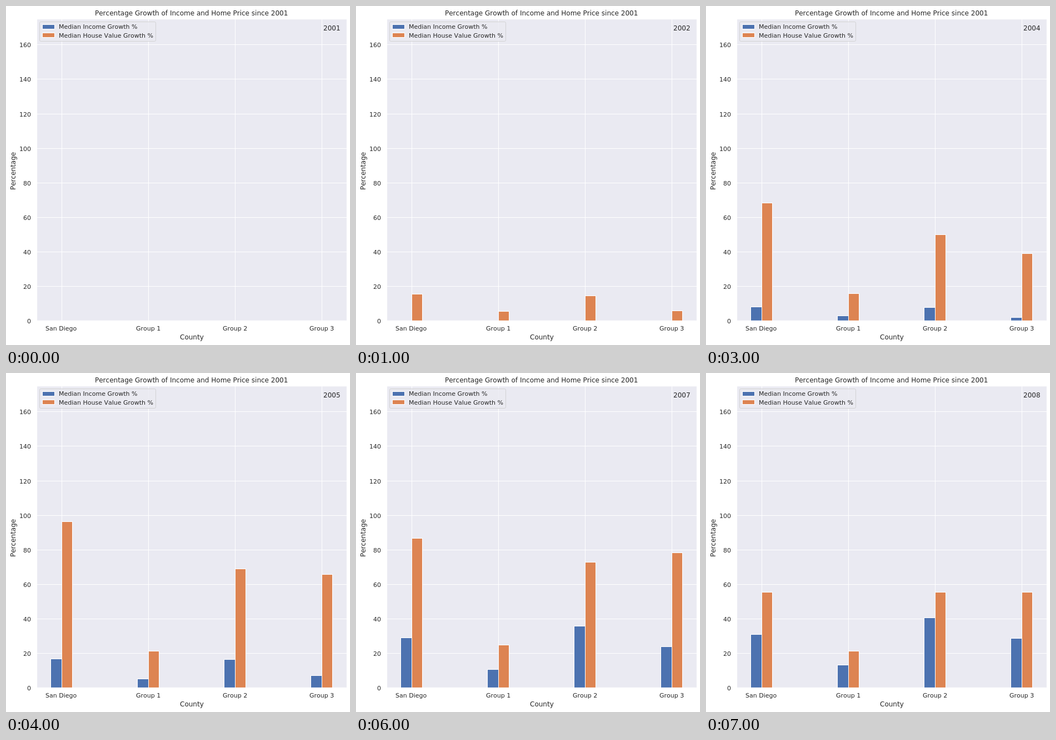
Recreate the animation shown at these times as an HTML page. Size 619 px wide and 610 px high, loop 8 s.

```html
<!DOCTYPE html>
<html lang="en">
<head>
<meta charset="utf-8">
<title>Income and home price growth</title>
<style>
  html, body { margin: 0; width: 100%; height: 100%; overflow: hidden; background: #fff; }
  svg { display: block; }
  text { font: 11px "DejaVu Sans", sans-serif; font-kerning: none; fill: #262626; }
  .big { font-size: 12px; }
  .end { text-anchor: end; }
  .grid { stroke: #fff; }
  .income { fill: #4c72b0; stroke: #fff; }
  .house { fill: #dd8452; stroke: #fff; }
</style>
</head>
<body>
<svg width="619" height="610" viewBox="0 0 619 610">
  <clipPath id="plot"><rect x="56" y="24" width="557" height="542"/></clipPath>
  <rect x="56" y="24" width="557" height="542" fill="#eaeaf2"/>
  <g id="axes"></g>
  <g id="bars" clip-path="url(#plot)"></g>
  <rect x="55.5" y="23.5" width="558" height="543" fill="none" stroke="#fff" stroke-width="1.25"/>
  <rect x="60.5" y="28.5" width="209" height="35" rx="2.2" fill="#eaeaf2" fill-opacity=".8" stroke="#ccc" stroke-opacity=".8"/>
  <rect class="income" x="65.5" y="33.5" width="22" height="8"/>
  <rect class="house" x="65.5" y="48.5" width="22" height="8"/>
  <text x="95" y="41">Median Income Growth %</text>
  <text x="95" y="57">Median House Value Growth %</text>
  <text class="big" x="160" y="17">Percentage Growth of Income and Home Price since 2001</text>
  <text class="big" x="313" y="600">County</text>
  <text class="big" transform="translate(17 331) rotate(-90)">Percentage</text>
  <text class="big" id="year" x="571" y="44">2001</text>
</svg>
<script>
const STEP = 1000, FIRST_YEAR = 2001, YEARS = 8;

// income: S-curve limit, midpoint, steepness; house: bell peak, peak time, spread
const counties = [
  { name: "San Diego", income: [33.5, 3.82, 1.1], house: [105, 4.8, 2.75] },
  { name: "Group 1", income: [20, 5.2, 0.56], house: [25.3, 5.5, 3.65] },
  { name: "Group 2", income: [46, 4.45, 0.95], house: [78.3, 5.13, 3.19] },
  { name: "Group 3", income: [33.5, 4.95, 1.1], house: [84, 5.3, 2.63] }
];

// Growth in percent, t years after the first; income dips slightly before it rises
const curves = {
  income: (t, [limit, mid, k]) => Math.max(0, limit / (1 + Math.exp(k * (mid - t))) - 1.5),
  house: (t, [peak, mid, spread]) => t ? peak * Math.exp(-(((t - mid) / spread) ** 2)) : 0
};

const $ = id => document.getElementById(id);
const yOf = v => Math.floor(566.8 - 3.1065 * v) + 0.5;
const xOf = i => 100.5 + 156 * i;

function add(parent, tag, attrs, text = "") {
  const el = document.createElementNS("http://www.w3.org/2000/svg", tag);
  for (const k in attrs) el.setAttribute(k, attrs[k]);
  el.textContent = text;
  return $(parent).appendChild(el);
}

for (let v = 0; v <= 160; v += 20) {
  const y = yOf(v);
  add("axes", "path", { class: "grid", d: `M56 ${y}H613` });
  add("axes", "text", { class: "end", x: 45, y: y + 4.5 }, v);
}

const bars = [];
counties.forEach((county, i) => {
  const x = xOf(i);
  add("axes", "path", { class: "grid", d: `M${x} 24V566` });
  add("axes", "text", { x: x - (i ? 22.5 : 29.5), y: 584 }, county.name);
  for (const kind of ["income", "house"]) {
    const house = kind === "house";
    const el = add("bars", "rect", { class: kind, x: house ? x : x - 20, width: house ? 19 : 20 });
    bars.push({ el, value: t => curves[kind](t, county[kind]) });
  }
});

let shown = -1;
function draw(now) {
  const t = Math.floor(now / STEP) % YEARS;
  if (t !== shown) {
    shown = t;
    $("year").textContent = FIRST_YEAR + t;
    for (const { el, value } of bars) {
      const y = yOf(value(t));
      el.setAttribute("y", y);
      el.setAttribute("height", 566.5 - y);
    }
  }
  requestAnimationFrame(draw);
}
draw(performance.now());
</script>
</body>
</html>
```
